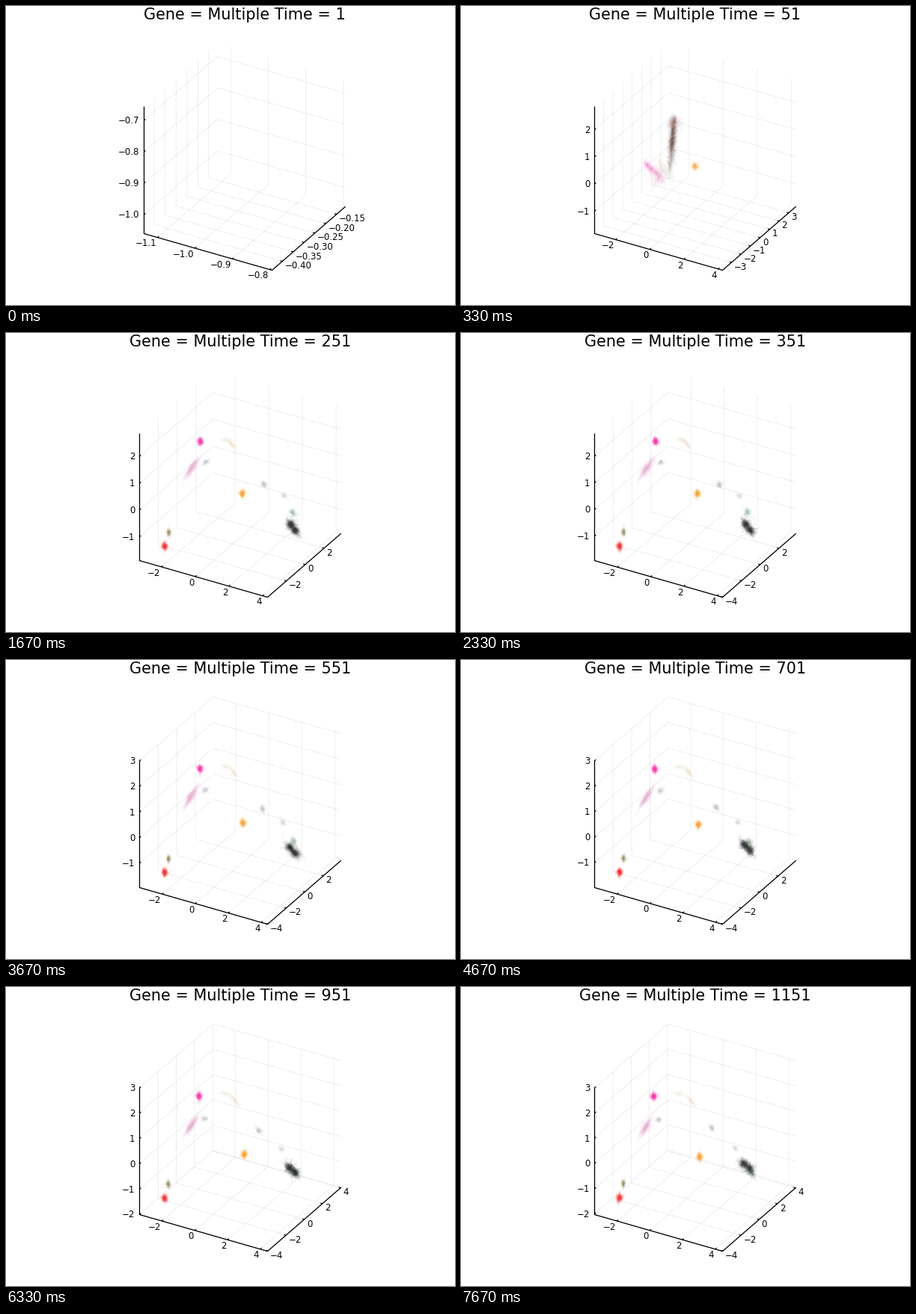
A matplotlib script that plays this animation: 600 by 400 pixels, repeating every 8 s.

```python
import numpy as np
import matplotlib.pyplot as plt
from matplotlib.animation import FuncAnimation
from matplotlib.collections import LineCollection

W, H, DPI = 600, 400, 100
FRAMES, INTERVAL = 80, 100
STAGES_PER_10_FRAMES = 3
LAST_STAGE = 23
PX = 72 / DPI
plt.rcParams["font.family"] = "DejaVu Sans"

fig = plt.figure(figsize=(W / DPI, H / DPI), dpi=DPI, facecolor="white")
ax = fig.add_axes([0, 0, 1, 1])

# Screen directions of the box edges
EDGE = np.array([(171, 49), (98.2, -85.3), (0, -170)])

# Where trajectories begin and branch
START, HUB = (277, 243), (285, 150)
LEFT = (START, HUB, (245, 220))
RIGHT = (START, HUB, (345, 195), (362, 213))
LOOP = (START, (262, 225), (241, 205))
BACK = (START, (262, 195))
clouds = []


def ramp(k, begin, end, first, last, power=1):
    """Ease from begin to end while k runs from first to last."""
    return begin + (end - begin) * np.clip((k - first) / (last - first), 0, 1) ** power


def limits(k):
    if k == 0:
        return (-1.136, -0.794), (-0.4473, -0.109), (-1.0607, -0.656)
    return ((ramp(k, -3.23, -3.37, 3, 7), ramp(k, 4.26, 4.45, 3, 16)),
            (ramp(k, -3.94, -4.025, 3, 6), ramp(k, 3.77, 4.06, 3, 20)),
            (ramp(k, -1.83, -2.03, 3, 23, 0.5), ramp(k, 2.85, 3.01, 7, 10)))


def cloud(color, begin, end, route, spread=(2.4, 1.7), angle=90, lines=45, alpha=0.065):
    clouds.append((color, np.array(begin), np.array(end), route, spread,
                   np.radians(angle), lines, alpha))


cloud("#efcf98", (294, 143), (292, 143), BACK, (3.4, 1.5), 10, 13, 0.025)
cloud("#f3c583", (302, 149), (307, 152), BACK, (3.8, 1.4), 50, 16, 0.028)
cloud("#ec86c4", (248, 181), (247, 187), LOOP, (7, 2), -57, 32, 0.04)
cloud("#ff2cae", (260, 145), (257.5, 146.5), LOOP)
cloud("#6f7878", (267, 173), (264.5, 177), (START, HUB), (2.3, 1.8), -40, 13, 0.035)
cloud("#8a7835", (217.5, 267), (217, 263), LEFT, (2.4, 1.4), 90, 28, 0.05)
cloud("#ff2626", (212, 285), (211.5, 282), LEFT)
cloud("#ffa21f", (316, 215), (319, 227), ((311, 214),), alpha=0.06)
cloud("#6a7070", (345, 203), (335, 188), (START, HUB), (2.4, 1.7), 60, 15, 0.037)
cloud("#8a8e8e", (372, 218), (366.5, 215.5), RIGHT[:3], (2.1, 1.6), 50, 12, 0.03)
cloud("#5f9a6c", (383, 240), (388, 250), RIGHT, (2.6, 2), 60, 22, 0.04)
cloud("#1a1c1c", (380.5, 256), (378, 237), RIGHT, (3.5, 2.6), 60, 48, 0.05)
cloud("#1a1c1c", (386.5, 264), (386, 243), RIGHT, (3.5, 2.5), 55, 46, 0.05)


def along(points, s):
    """Points at fractions s of a polyline's length."""
    points = np.asarray(points, float)
    steps = np.hypot(*np.diff(points, axis=0).T)
    dist = np.r_[0, np.cumsum(steps)] / steps.sum()
    return np.stack([np.interp(s, dist, points[:, i]) for i in (0, 1)], axis=-1)


def wander(rng, lines, steps):
    """Correlated, slightly spiky noise for each trajectory."""
    noise = rng.laplace(scale=0.75, size=(lines, steps, 2))
    for j in range(1, steps):
        noise[:, j] = 0.75 * noise[:, j - 1] + 0.66 * noise[:, j]
    return noise


def draw_cloud(k, index):
    color, begin, end, route, spread, angle, lines, alpha = clouds[index]
    rng = np.random.default_rng(100 * k + index)
    steps = 32
    head = ramp(k, begin, end, 7, LAST_STAGE)

    # Early on, trajectories still travel between the low and high fractions
    low, high = min(1, (k - 1) / 4), min(1, 0.43 * k)
    arrive = high - 0.45 * (high - low) * rng.random((lines, 1))
    depart = low + (arrive - low) * rng.random((lines, 1)) ** 0.5
    travel = depart + (arrive - depart) * np.linspace(0, 1, steps)

    c, s = np.cos(angle), np.sin(angle)
    offset = (wander(rng, lines, steps) * spread) @ np.array([(c, s), (-s, c)])
    paths = along([*route, head], travel) + offset
    ax.add_collection(LineCollection(paths, colors=color, linewidths=0.8 * PX,
                                     alpha=alpha * (0.6 + 0.4 * low)))


def ticks(k, axis, lo, hi):
    """Pairs of position along the axis and label."""
    if k == 0:
        step, digits = ((0.1, 1), (0.05, 2), (0.1, 1))[axis]
    else:
        step, digits = (2, 1 if k < 5 else 2, 1)[axis], 0
    for n in range(int(np.ceil(lo / step)), int(np.floor(hi / step)) + 1):
        yield (n * step - lo) / (hi - lo), f"{n * step:.{digits}f}".replace("-", "−")


def draw_box(k):
    origin = np.array([184.5 if k == 0 else 178.5, 304.5])
    lims = limits(k)
    grid, marks = [], []

    def at(*corners):
        return origin + np.array(corners) @ EDGE

    def label(corner, dx, dy, text, align):
        x, y = at(corner)[0]
        ax.text(x + dx, y + dy + 4.3, text, ha=align, va="baseline", size=11.8 * PX)

    for t, text in ticks(k, 0, *lims[0]):
        grid.append(at((t, 0, 0), (t, 1, 0), (t, 1, 1)))
        marks.append(at((t, 0, 0), (t, 0.018, 0)))
        label((t, 0, 0), -1.5, 7.5, text, "right")
    for t, text in ticks(k, 1, *lims[1]):
        grid.append(at((1, t, 0), (0, t, 0), (0, t, 1)))
        marks.append(at((1, t, 0), (0.985, t, 0)))
        label((1, t, 0), 3.3, 5.3, text, "left")
    for t, text in ticks(k, 2, *lims[2]):
        grid.append(at((0, 0, t), (0, 1, t), (1, 1, t)))
        marks.append(at((0, 0, t), (0, 0.018, t)))
        label((0, 0, t), -6.3, 0, text, "right")
    marks.append(at((0, 0, 1), (0, 0, 0), (1, 0, 0), (1, 1, 0)))

    ax.add_collection(LineCollection(grid, colors="black", alpha=0.085,
                                     linewidths=0.75 * PX, snap=False))
    ax.add_collection(LineCollection(marks, colors="black", linewidths=1.3 * PX,
                                     snap=False))
    ax.text(origin[0] + 134.3, 18, f"Gene = Multiple Time = {50 * k + 1}",
            ha="center", va="baseline", size=20.75 * PX)


def label_corner_fix(draw_label):
    return draw_label


def draw(frame):
    k = (STAGES_PER_10_FRAMES * frame + 2) // 10
    ax.cla()
    ax.set(xlim=(0, W), ylim=(H, 0))
    ax.axis("off")
    draw_box(k)
    if k:
        for index in range(len(clouds)):
            draw_cloud(k, index)
    return []


anim = FuncAnimation(fig, draw, frames=FRAMES, interval=INTERVAL,
                     init_func=lambda: [], repeat=True, repeat_delay=0)
plt.show()
```
